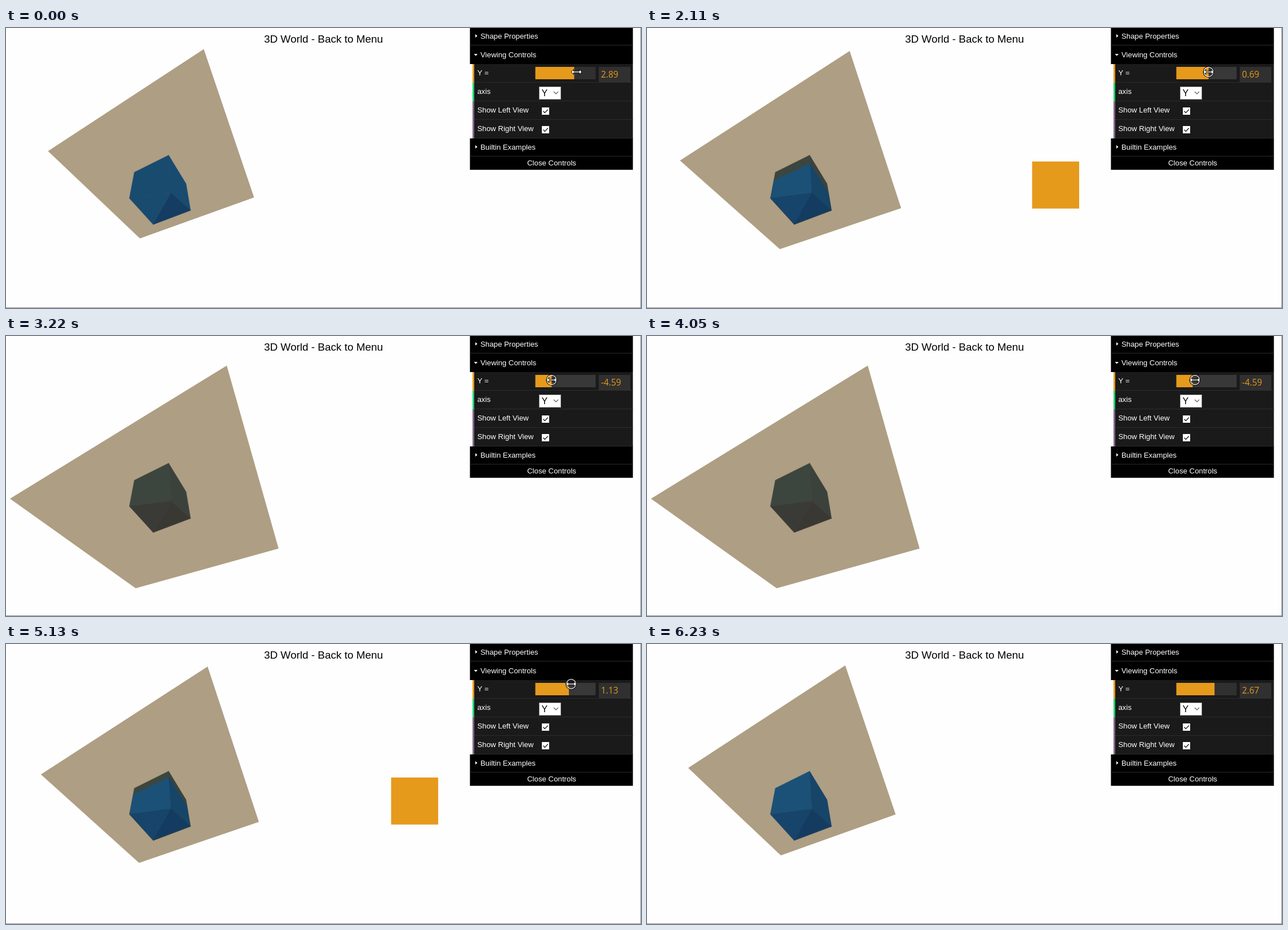
Write an HTML page with a canvas that moves like this. It is 1127 px wide and 497 px high and loops after 6.44 s.

```html
<!DOCTYPE html>
<html lang="en">
<head>
<meta charset="utf-8">
<title>3D World</title>
<style>
html, body { margin: 0; width: 100%; height: 100%; overflow: hidden; background: #fefefe; }
canvas { display: block; }
</style>
</head>
<body>
<canvas id="stage" width="1127" height="497"></canvas>
<script>
const ctx = document.getElementById('stage').getContext('2d');
const LOOP = 6440, PRESS = 710, REPAINT = 880, RETURN = 4050, RELEASE = 5580, LEAVE = 6230;
const ORANGE = '#e69a1c', SANS = '"Liberation Sans", Arial, sans-serif';
const START = 2.89, UNIT = 0.22;

// Drags of the slider: first step, last step, value reached
const DRAGS = [
  [880, 880, 3.11], [1540, 1540, 2.67], [1640, 2110, 0.69], [2190, 2710, -2.83],
  [2790, 3220, -4.59], [3400, 3400, -4.81], [3730, 3830, -4.59],
  [4190, 4500, -2.61], [4640, 5130, 1.13], [5210, 5380, 2.67]
];

// Camera below the scene, looking up at the origin
const DIST = 23, FOCAL = 335.2, MID_X = 274.8, MID_Y = 288;
const PITCH = 50.3 * Math.PI / 180, TURN = 60.4 * Math.PI / 180;
// Half sizes of cube and plane, and the height of the tip below one corner
const HALF = 2.5, PLANE = 10, TIP = -4.5;

const LIT = ['#1b5176', '#174568', '#17446a', '#143c60'];
const FLAT = ['#194b6f', '#194b6f', '#194b6f', '#153c61'];
const SHADED = ['#3c463f', '#3b423c', '#3a3b37', '#3a3833'];

const mix = (a, b, t) => a + (b - a) * t;
const clamp = (v, lo, hi) => Math.max(lo, Math.min(hi, v));

function project([a, b, y]) {
  const ahead = a * Math.cos(TURN) + b * Math.sin(TURN);
  const right = b * Math.cos(TURN) - a * Math.sin(TURN);
  const up = y * Math.cos(PITCH) - ahead * Math.sin(PITCH);
  const scale = FOCAL / (DIST + y * Math.sin(PITCH) + ahead * Math.cos(PITCH));
  return [MID_X + right * scale, MID_Y - up * scale];
}

// Square from corner (lo, lo) to (hi, hi) at height y
const square = (lo, hi, y) => [[lo, lo, y], [lo, hi, y], [hi, hi, y], [hi, lo, y]].map(project);

const [aTop, bTop, , dTop] = square(-HALF, HALF, HALF);
const [, bLow, cLow, dLow] = square(-HALF, HALF, -HALF);
const tip = project([-HALF, -HALF, TIP]);
const OUTLINE = [dTop, aTop, bTop, bLow, cLow, dLow];
const FACES = [
  [dTop, aTop, tip, dLow],
  [aTop, bTop, bLow, tip],
  [dLow, tip, cLow],
  [cLow, tip, bLow]
];

function trace(points) {
  ctx.beginPath();
  points.forEach(p => ctx.lineTo(p[0], p[1]));
}

function line(points, color, width) {
  trace(points);
  ctx.strokeStyle = color;
  ctx.lineWidth = width;
  ctx.stroke();
}

function poly(points, color, edge, width = 1) {
  trace(points);
  ctx.closePath();
  ctx.fillStyle = color;
  ctx.fill();
  if (!edge) return;
  ctx.strokeStyle = edge;
  ctx.lineWidth = width;
  ctx.stroke();
}

function rect(x, y, w, h, color) {
  ctx.fillStyle = color;
  ctx.fillRect(x, y, w, h);
}

function text(str, x, y, size = 13.25, color = '#fff', font = SANS, align = 'left') {
  ctx.font = size + 'px ' + font;
  ctx.textAlign = align;
  ctx.fillStyle = color;
  ctx.fillText(str, x, y);
}

function ring(x, y, r, color) {
  ctx.beginPath();
  ctx.arc(x, y, r, 0, Math.PI * 2);
  ctx.strokeStyle = color;
  ctx.lineWidth = 1.2;
  ctx.stroke();
}

function sliderValue(t) {
  let value = START;
  for (const [from, to, goal] of DRAGS) {
    if (t < from) break;
    const steps = Math.round((to - from) / 80) + 1;
    const gap = (to - from) / (steps - 1) || 1;
    const done = Math.min(steps, Math.floor((t - from) / gap + 1e-6) + 1);
    value = mix(value, goal, done / steps);
  }
  return START - UNIT * Math.round((START - value) / UNIT);
}

function drawFaces(colors) {
  FACES.forEach((face, i) => poly(face, colors[i], colors[i], 0.6));
}

function drawWorld(value, t) {
  poly(square(-PLANE, PLANE, value), '#ae9e83');

  const lit = t < REPAINT ? FLAT : LIT;
  if (value >= HALF) {
    drawFaces(lit);
    return;
  }
  drawFaces(SHADED);
  if (value <= TIP) return;

  // Below the cube the section shrinks towards the tip's corner
  const size = clamp((value - TIP) / (-HALF - TIP), 0, 1);
  const [a, b, c, d] = square(-HALF, mix(-HALF, HALF, size), value);
  ctx.save();
  trace(OUTLINE);
  ctx.clip();
  trace(value < -HALF ? [a, b, c, d] : [d, a, b, bLow, cLow, dLow]);
  ctx.clip();
  drawFaces(lit);
  ctx.restore();

  const side = 84 * size;
  rect(683.5, 321 - side, side - 0.5, side - 0.5, ORANGE);
}

function checkbox(y) {
  rect(951, y, 13, 13, '#fff');
  line([[953.5, y + 6.5], [956.3, y + 9.5], [961.7, y + 3.7]], '#222', 1.4);
}

function marker(y) {
  poly([[833, y - 3], [836.5, y], [833, y + 3]], '#fff');
}

const edgeX = value => 939.5 + 107 * (value + 10) / 20;

function drawPanel(value, t) {
  rect(823.4, 0, 289.2, 64, '#000');
  rect(823.4, 30, 289.2, 1, '#2c2c2c');
  rect(828, 64, 284.6, 132, '#1a1a1a');
  [ORANGE, '#1ed36f', '#806787', '#806787'].forEach((color, i) => {
    rect(828, 64 + 33 * i, 3, 33, color);
    rect(831, 96 + 33 * i, 281.6, 1, '#2c2c2c');
  });
  rect(823.4, 196, 289.2, 55.7, '#000');
  rect(823.4, 227, 289.2, 1, '#2c2c2c');

  marker(14);
  marker(211);
  poly([[830.5, 46], [837, 46], [833.7, 49.5]], '#fff');
  text('Shape Properties', 842, 19);
  text('Viewing Controls', 842, 52);
  ['Y =', 'axis', 'Show Left View', 'Show Right View'].forEach((label, i) => {
    text(label, 836.5, 84 + 33 * i);
  });
  text('Builtin Examples', 842, 216);
  text('Close Controls', 968.5, 244, 13.25, '#fff', SANS, 'center');

  const active = t >= PRESS && t < RELEASE;
  rect(939.5, 69, 107, 22, active ? '#383838' : '#303030');
  rect(939.5, 69, edgeX(value) - 939.5, 22, ORANGE);
  rect(1052, 69, 56, 28, '#303030');
  text(value.toFixed(2), 1056, 88, 15.5, ORANGE, '"Open Sans", "Noto Sans", sans-serif');

  rect(946, 104, 39, 23, '#a9a9a9');
  rect(947, 105, 37, 21, '#fff');
  text('Y', 950.5, 121, 16, '#000');
  line([[972, 113], [976, 117], [980, 113]], '#555', 1.1);
  checkbox(141);
  checkbox(174);
}

function resizeCursor(x, y, pressed) {
  if (pressed) {
    ring(x, y, 9.4, '#000');
    ring(x, y, 8.4, '#fff');
  }
  const half = [[-9.5, 0], [-5, -4.5], [-5, -1.2], [5, -1.2], [5, -4.5], [9.5, 0]];
  const lower = half.slice(1, 5).reverse().map(p => [p[0], -p[1]]);
  poly(half.concat(lower).map(p => [x + p[0], y + p[1]]), '#fff', '#000');
}

function arrowCursor(x, y) {
  const shape = [[0, 0], [0, 16], [4, 12.5], [6.5, 18], [9, 17], [6.5, 11.5], [11.5, 11.5]];
  poly(shape.map(p => [x + p[0], y + p[1]]), '#fff', '#000');
}

function drawCursor(t, value) {
  if (t >= LEAVE) return;
  if (t < RELEASE) {
    // The pointer runs a little ahead when dragging right
    const lead = t < 1540 || t >= RETURN ? 4 : 0;
    const lift = 7 * clamp((t - RETURN) / 1000, 0, 1);
    resizeCursor(edgeX(value) + lead, 78 - lift, t >= PRESS);
    return;
  }
  const k = Math.min(1, Math.floor((t - RELEASE) / 47) / 13);
  const turn = 0.55;
  if (k === 0) {
    resizeCursor(1010, 71, false);
  } else if (k < turn) {
    arrowCursor(mix(1010, 912, k / turn), mix(71, 345, k / turn));
  } else {
    const u = (k - turn) / (1 - turn);
    arrowCursor(mix(912, 1121, u), mix(345, 493, u));
  }
}

function draw(t) {
  const value = sliderValue(t);
  rect(0, 0, 1127, 497, '#fefefe');
  text('3D World - Back to Menu', 563.5, 26, 18.95, '#000', SANS, 'center');
  drawWorld(value, t);
  drawPanel(value, t);
  rect(1126, 0, 1, 497, '#8c8c8c');
  rect(0, 496, 1127, 1, '#8c8c8c');
  drawCursor(t, value);
}

const start = performance.now();
function tick() {
  draw((performance.now() - start) % LOOP);
  requestAnimationFrame(tick);
}
tick();
</script>
</body>
</html>
```
